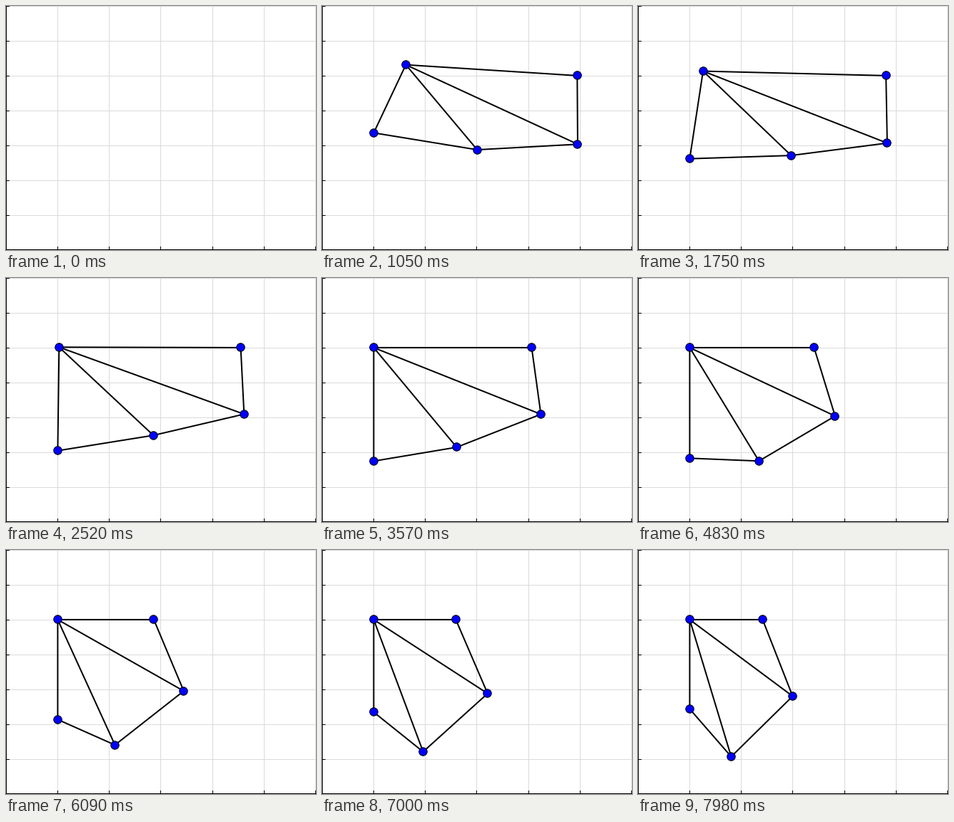
Animation of 434 by 343 pixels, one loop 8 s. Source, as a matplotlib script:

```python
import numpy as np
import matplotlib.pyplot as plt
from matplotlib.animation import FuncAnimation

W, H, DPI = 434, 343, 64
PX = 72 / DPI              # one pixel in points
LOOP, TICK, STEP = 8000, 20, 70

# The hub slides into the corner until PIN, then stays there (seconds)
START, PIN, END = 0.07, 2.8, 7.98
CORNER_X, CORNER_Y = 72.4, 97.9
SLOPE = 0.339


def ease(t, pos, speed):
    """Cubic path given by position and speed at START, PIN and END."""
    k = 0 if t < PIN else 1
    t0, t1 = (START, PIN, END)[k:k + 2]
    h = t1 - t0
    u = (t - t0) / h
    bend = h * u * (1 - u) * ((1 - u) * speed[k] - u * speed[k + 1])
    return pos[k] + (pos[k + 1] - pos[k]) * u * u * (3 - 2 * u) + bend


def joints(t):
    left = max(0, (PIN - t) / (PIN - START))
    dx = 96.7 * left ** 1.72
    return np.array([
        [CORNER_X + dx, CORNER_Y - SLOPE * dx],
        [CORNER_X, ease(t, (117, 249, 223.5), (66, 18, 1))],
        [ease(t, (216.9, 201.8, 130.5), (2, -18, -11)),
         ease(t, (195.7, 225.6, 290.5), (3, 16, 5))],
        [ease(t, (361.6, 326.3, 216.5), (2, -26.3, -14)),
         ease(t, (195.8, 191.2, 205.5), (-0.5, -0.3, 3.7))],
        [361.7 - 198 * (1 - np.exp(-(t / 5.114) ** 2.4)), CORNER_Y],
    ])


fig = plt.figure(figsize=(W / DPI, H / DPI), dpi=DPI, facecolor="white")
ax = fig.add_axes([0, 0, 1, 1])
ax.set_xlim(0, W)
ax.set_ylim(H, 0)
ax.axis("off")

# Whole coordinates snap to the centre of that pixel
cols = [int(W / 6 * k - 0.1) for k in range(1, 7)]
rows = [49 * k for k in range(7)]
thin = dict(linewidth=PX, antialiased=False)
ax.vlines(cols, 0, H, color="#dadada", **thin)
ax.hlines(rows, 0, W, color="#dadada", **thin)
ax.vlines(cols, H - 5, H, color="black", **thin)
ax.hlines(rows, 0, 4, color="black", **thin)
ax.vlines(0, -1, H, color="black", **thin)
ax.hlines(H - 1, -1, W, color="black", **thin)

# One stroke that covers all seven bars
ROUTE = [2, 0, 1, 2, 3, 0, 4, 3]
bars, = ax.plot([], [], color="black", lw=2 * PX, solid_joinstyle="round", zorder=3)
dots, = ax.plot([], [], "o", ms=11.5 * PX, mfc="#0000ff", mec="black",
                mew=PX, zorder=4)


def draw(i):
    step = (i * TICK + TICK // 2) // STEP
    if step == 0:
        bars.set_data([], [])
        dots.set_data([], [])
    else:
        pts = joints(step * STEP / 1000)
        bars.set_data(*pts[ROUTE].T)
        dots.set_data(*(pts - 0.5).T)   # marker snapping rounds up
    return bars, dots


anim = FuncAnimation(fig, draw, frames=LOOP // TICK, interval=TICK,
                     init_func=lambda: draw(0), repeat=True, repeat_delay=0)
plt.show()
```
